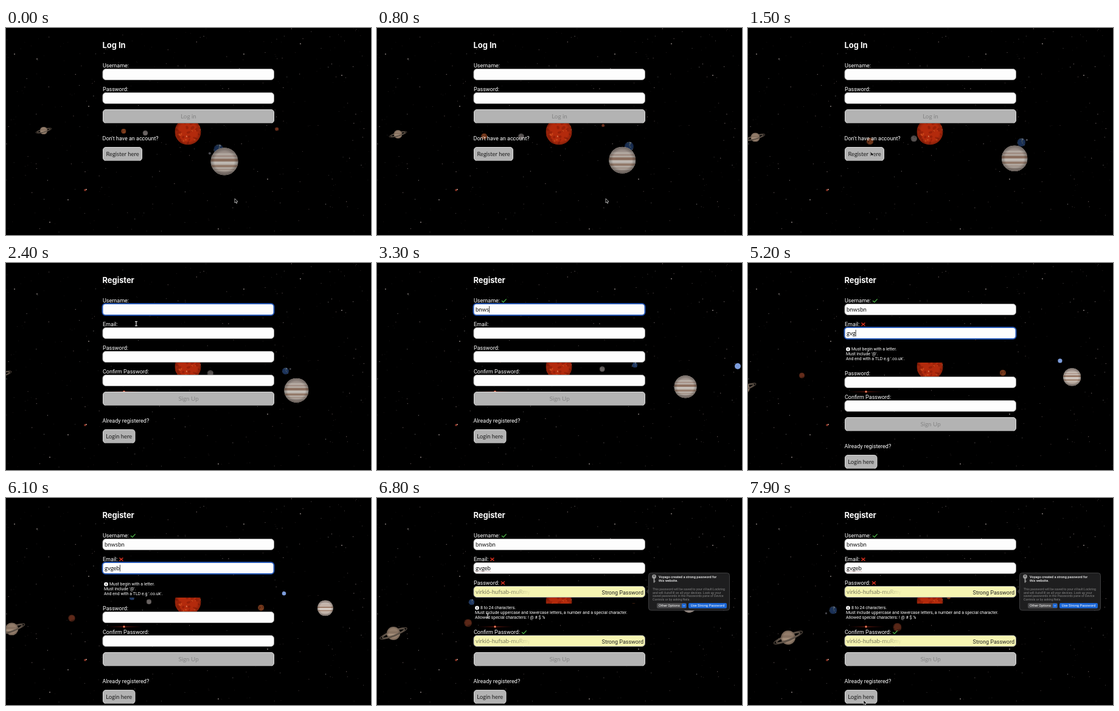
These frames come from a looping animation (600 px wide and 341 px high, 8 s). An HTML page with a canvas:

```html
<!DOCTYPE html>
<html lang="en">
<head>
<meta charset="utf-8">
<title>Register</title>
<style>
html, body { margin: 0; height: 100%; overflow: hidden; background: #000; }
canvas { display: block; width: 100vw; height: 100vh; }
</style>
</head>
<body>
<canvas id="stage" width="600" height="341"></canvas>
<script>
const g = document.getElementById('stage').getContext('2d');
const LOOP = 8000, TAU = Math.PI * 2;
const UI = 'Roboto, Inter, sans-serif', ROUND = 'Lato, "Open Sans", sans-serif';

// ---------- helpers ----------
const KEYS = [0, 1500, 2400, 3300, 5200, 6800, 7900];

// Smooth curve through values given at KEYS
function at(v, t) {
  const last = KEYS.length - 1;
  let i = 0;
  while (i < last - 1 && t >= KEYS[i + 1]) i++;
  const slope = k => {
    const a = Math.max(0, k - 1), b = Math.min(last, k + 1);
    return (v[b] - v[a]) / (KEYS[b] - KEYS[a]);
  };
  const h = KEYS[i + 1] - KEYS[i], u = (t - KEYS[i]) / h, w = 1 - u;
  return v[i] * w * w * (1 + 2 * u) + v[i + 1] * u * u * (3 - 2 * u)
    + h * u * w * (w * slope(i) - u * slope(i + 1));
}

function text(str, x, y, font, color, align = 'left') {
  g.font = font;
  g.fillStyle = color;
  g.textAlign = align;
  g.textBaseline = 'alphabetic';
  g.fillText(str, x, y);
}

function box(x, y, w, h, r, fill, stroke, line = 1) {
  g.beginPath();
  g.roundRect(x, y, w, h, r);
  if (fill) { g.fillStyle = fill; g.fill(); }
  if (stroke) { g.strokeStyle = stroke; g.lineWidth = line; g.stroke(); }
}

function disc(x, y, r, fill) {
  g.beginPath();
  g.arc(x, y, r, 0, TAU);
  g.fillStyle = fill;
  g.fill();
}

function path(points, color, width) {
  g.beginPath();
  points.forEach(([x, y]) => g.lineTo(x, y));
  g.strokeStyle = color;
  g.lineWidth = width;
  g.stroke();
}

function random(seed) {
  return () => (seed = (seed * 16807) % 2147483647) / 2147483647;
}

// ---------- sky ----------
function drawStars() {
  const rnd = random(77);
  for (let i = 0; i < 420; i++) {
    const x = rnd() * 600, y = rnd() * 338, b = rnd();
    const c = 45 + b * b * 65, warm = rnd() * 20;
    disc(x, y, .35 + b * b * .35, `rgb(${c + warm},${c},${c})`);
  }
  for (const [x, y] of [[391, 43], [430, 249], [136, 129], [14, 43], [51, 51], [102, 283], [72, 320], [349, 331], [484, 26], [552, 78]])
    disc(x, y, .9, '#8f8784');
  disc(130, 267, 1.8, '#8c3324');
  disc(132, 266, .9, '#d9b0a0');
  const flare = g.createLinearGradient(165, 0, 225, 0);
  flare.addColorStop(0, '#4000');
  flare.addColorStop(.5, '#902416');
  flare.addColorStop(1, '#4000');
  g.fillStyle = flare;
  g.fillRect(165, 211.6, 60, 1);
  disc(194, 212, 2, '#b03a22');
  disc(194, 212, .9, '#ffc0a0');
}

// Sphere with surface marks and a shaded rim
function globe(x, y, r, base, marks, dark = 0) {
  g.save();
  g.translate(x, y);
  g.scale(r, r);
  g.beginPath();
  g.arc(0, 0, 1, 0, TAU);
  g.clip();
  g.fillStyle = base;
  g.fillRect(-1, -1, 2, 2);
  marks();
  const rim = g.createRadialGradient(0, 0, .7, 0, 0, 1);
  rim.addColorStop(0, `rgba(0,0,0,${dark})`);
  rim.addColorStop(1, `rgba(0,0,0,${dark + .25})`);
  g.fillStyle = rim;
  g.fillRect(-1, -1, 2, 2);
  g.restore();
}

function blotches(color, n, size, seed) {
  const rnd = random(seed);
  for (let i = 0; i < n; i++) {
    g.beginPath();
    g.ellipse(rnd() * 2 - 1, rnd() * 2 - 1, size * (.5 + rnd()), size * (.3 + rnd() * .5), rnd() * 3, 0, TAU);
    g.fillStyle = color;
    g.fill();
  }
}

function jupiterBands() {
  for (const [y, h, c] of [[-1, .4, '#bfb0a8'], [-.45, .12, '#c4aca0'], [-.2, .2, '#a98672'], [.02, .16, '#ece4dc'], [.26, .16, '#b3937f'], [.55, .1, '#c3b0a4'], [.72, .3, '#b3a49b']]) {
    g.fillStyle = c;
    g.fillRect(-1, y, 2, h);
  }
}

const drawSun = () => globe(299, 171, 21.5, '#b32a0c', () => {
  blotches('#9a2008', 26, .14, 5);
  blotches('#c8461a', 12, .09, 31);
  blotches('#f0b080', 3, .06, 9);
});

// R: orbit radius, r: size at the sun's depth, turn: degrees from the front
const planets = [
  { R: 70, r: 4.3, turn: [-90, -18, 26, 78, 176, 312, 350], base: '#6b6564',
    marks: () => blotches('#4d4847', 6, .25, 3) },
  { R: 117, r: 4.4, turn: [-104, -40, -15, 10, 60, 70, 160], base: '#83401f',
    marks: () => blotches('#5e2814', 6, .3, 8) },
  { R: 149, r: 5, turn: [12, 48, 74.5, 109, 185, 265, 303], base: '#1e3762', moon: true,
    marks: () => { blotches('#4f6068', 4, .3, 12); blotches('#8f9fb8', 3, .2, 44); } },
  { R: 184, r: 3.6, turn: [111, 175, 200, 225, 297, 332.5, 351.3], base: '#6e301d',
    marks: () => blotches('#4c2215', 5, .3, 17) },
  { R: 199, r: 10.8, turn: [8.3, 20.8, 28.9, 37.5, 60.8, 81, 95], base: '#dcd0c6', marks: jupiterBands }
];

function drawPlanet(p, t) {
  const { x, y, s, z } = p;
  if (p.moon) {
    const a = t / 3950 * TAU;
    disc(x - 9 * s * Math.cos(a), y + 4 * s * Math.cos(a), 1.2 * s, '#4a4a50');
  }
  globe(x, y, p.r * s, p.base, p.marks, Math.max(0, z) * .2);
}

function drawSaturn(t) {
  const x = at([62, 12, -8, -20, -7, 27, 66], t);
  const y = at([169, 180, 184, 190, 206, 223, 230], t);
  const r = at([6.3, 7.6, 8.2, 8.8, 9.8, 11, 11.8], t);
  const tilt = -.25 - .14 * t / LOOP;
  const ring = (from, to) => {
    for (const [k, w, c] of [[2.15, .14, '#4a4038'], [1.75, .2, '#5f5348']]) {
      g.beginPath();
      g.ellipse(x, y, r * k, r * k * .19, tilt, from, to);
      g.strokeStyle = c;
      g.lineWidth = r * w;
      g.stroke();
    }
  };
  ring(Math.PI, TAU);
  globe(x, y, r, '#927c6a', () => {
    g.fillStyle = '#85705f';
    g.fillRect(-1, -.3, 2, .25);
    g.fillStyle = '#a8927e';
    g.fillRect(-1, .1, 2, .2);
  });
  ring(0, Math.PI);
}

function drawSky(t) {
  drawStars();
  disc(at([640, 625, 612, 593, 513, 410, 340], t), at([186, 180, 176, 170, 161, 155, 154], t),
    at([6, 6, 5.5, 5, 3.6, 3, 2.6], t), '#7d9ddc');
  for (const p of planets) {
    const a = at(p.turn, t) * Math.PI / 180;
    p.z = Math.cos(a);
    p.depth = p.R * p.z;
    const drop = .114 * p.depth;
    p.s = 1 / (1 - .0232 * drop);
    p.x = 299 + p.R * Math.sin(a) * p.s;
    p.y = 173 + drop * p.s;
  }
  const sorted = [...planets].sort((a, b) => a.depth - b.depth);
  sorted.filter(p => p.depth < 0).forEach(p => drawPlanet(p, t));
  drawSun();
  sorted.filter(p => p.depth >= 0).forEach(p => drawPlanet(p, t));
  drawSaturn(t);
}

// ---------- form ----------
const USER = 'bnwsbn', USER_TIMES = [2900, 3000, 3100, 3200, 3800, 4000];
const EMAIL = 'gvgeb', EMAIL_TIMES = [4800, 5000, 5100, 5600, 5800];
const SWITCH = 2000, TO_EMAIL = 4400, TO_PASSWORD = 6400;
const typed = (str, times, t) => str.slice(0, times.filter(k => k <= t).length);

const NOTES = {
  user: ['4 to 24 characters.', 'Must begin with a letter.', 'Letters, numbers, underscores, hyphens allowed.'],
  email: ['Must begin with a letter.', "Must include '@'.", "And end with a TLD e.g '.co.uk'."],
  password: ['8 to 24 characters.', 'Must include uppercase and lowercase letters, a number and a special character.', 'Allowed special characters: ! @ # $ %']
};

function mark(x, y, ok) {
  if (ok) path([[x, y], [x + 2.7, y + 2.6], [x + 7.6, y - 2.6]], '#4fb84a', 1.3);
  else for (const d of [2.5, -2.5]) path([[x, y - d], [x + 6, y + d]], '#d8301e', 1.6);
}

function note(lines, y) {
  box(159, y + 29, 282, 29, 4, '#000');
  disc(164.5, y + 36, 3.3, '#fff');
  text('i', 164.5, y + 38.3, `bold 6px ${UI}`, '#000', 'center');
  lines.forEach((s, i) => text(s, i ? 161 : 170, y + 38.3 + i * 8, `7px ${UI}`, '#fff'));
}

function field(y, f) {
  text(f.label, 159, y - 2, `9px ${UI}`, '#fff');
  if (f.ok !== undefined) mark(159 + g.measureText(f.label).width + 3, y - 5, f.ok);
  if (f.focus) box(158.5, y, 282, 19, 5, '#fdfdfd', '#2456b4', 2);
  else box(159, y + .5, 281.5, 18, 5, f.auto ? '#f6f5b2' : '#fdfdfd', '#a0a0a0');
  if (f.auto) {
    const fade = g.createLinearGradient(215, 0, 255, 0);
    fade.addColorStop(0, '#77775c');
    fade.addColorStop(1, '#77775c00');
    text('virki6-hufsab-muRmy', 162, y + 12.6, `9.5px ${ROUND}`, fade);
    text('Strong Password', 438, y + 14.4, `9px ${UI}`, '#222', 'right');
  } else if (f.value) {
    text(f.value, 162, y + 12.6, `9.5px ${ROUND}`, '#111');
    const end = 162 + g.measureText(f.value).width;
    if (f.focus) path([[end + .5, y + 4], [end + .5, y + 15]], '#111', .8);
    if (f.spell) {
      g.setLineDash([1, 1]);
      path([[162, y + 15], [end, y + 15]], '#c99', 1);
      g.setLineDash([]);
    }
  }
}

function button(x, y, w, label, disabled) {
  box(x + .5, y + .5, w - 1, 22, 4.5, '#b3b3b3', '#dadada');
  path([[x + 4, y + 22.5], [x + w - 4, y + 22.5]], '#8a8a8a', 1);
  text(label, x + w / 2, y + 15, `${disabled ? 9.8 : 9.4}px ${ROUND}`, disabled ? '#858585' : '#1c1c1c', 'center');
}

function form(title, fields, action, question, link, linkWidth) {
  text(title, 158.5, 33, 'bold 12.9px Inter, Roboto, sans-serif', '#fff');
  let y = 67;
  for (const f of fields) {
    field(y, f);
    if (f.note) { note(f.note, y); y += 42; }
    y += 39;
  }
  y -= 11;
  button(159, y, 282, action, true);
  text(question, 158.5, y + 50.5, `9px ${UI}`, '#fff');
  button(159, y + 62, linkWidth, link, false);
}

function drawForm(t) {
  if (t < SWITCH) {
    form('Log In', [{ label: 'Username:' }, { label: 'Password:' }],
      'Log in', "Don't have an account?", 'Register here', 65);
    return;
  }
  const user = typed(USER, USER_TIMES, t), email = typed(EMAIL, EMAIL_TIMES, t);
  const onUser = t < TO_EMAIL, auto = t >= TO_PASSWORD, onEmail = !onUser && !auto;
  const userOk = user.length > 3;
  form('Register', [
    { label: 'Username:', value: user, focus: onUser, ok: user ? userOk : undefined,
      note: user && !userOk && NOTES.user },
    { label: 'Email:', value: email, focus: onEmail, spell: auto, ok: email ? false : undefined,
      note: email && onEmail && NOTES.email },
    { label: 'Password:', auto, ok: auto ? false : undefined, note: auto && NOTES.password },
    { label: 'Confirm Password:', auto, ok: auto || undefined }
  ], 'Sign Up', 'Already registered?', 'Login here', 53.5);
  if (auto) drawPopover();
}

function drawPopover() {
  g.beginPath();
  g.moveTo(447, 149);
  g.lineTo(442, 154);
  g.lineTo(447, 159);
  g.fillStyle = '#29292a';
  g.fill();
  box(446.5, 123.5, 133, 61.5, 4, '#1e1e1f', '#3f3f40');
  disc(455.5, 129.5, 3.4, '#9b9b9b');
  disc(455.5, 128.4, 1, '#1e1e1f');
  path([[455.5, 131], [455.5, 139.5]], '#9b9b9b', 1.8);
  path([[455.5, 137], [457.7, 137]], '#9b9b9b', 1.2);
  ['Voyago created a strong password for', 'this website.'].forEach((s, i) =>
    text(s, 463, 131.5 + i * 6.6, `500 5.6px ${UI}`, '#f2f2f2'));
  ['This password will be saved to your oVault Lockring', 'and will AutoFill on all your devices. Look up your',
    'saved passwords in the Passwords pane of Device', 'Controls or by asking Nela.'].forEach((s, i) =>
    text(s, 453, 151.6 + i * 5.9, `5.2px ${UI}`, '#858585'));
  box(460, 173, 49, 8.8, 2, '#4b4b4d');
  text('Other Options', 463, 179.3, `5.7px ${UI}`, '#fff');
  box(501, 173.8, 7.2, 7.2, 1.6, '#1a66d6');
  path([[503, 176.6], [504.6, 178.2], [506.2, 176.6]], '#fff', .7);
  box(512, 173, 63, 8.8, 2, '#1a66d6');
  text('Use Strong Password', 543.5, 179.3, `5.8px ${UI}`, '#fff', 'center');
}

// ---------- pointer ----------
const ROUTE = [[0, 376, 281], [850, 376, 281], [1450, 202, 204], [1950, 202, 204], [2350, 214, 100],
  [6400, 182, 194], [7200, 182, 194], [7750, 190, 333], [8000, 190, 333]];

function drawPointer(t) {
  if (t > 2800 && t < TO_PASSWORD) return;
  const i = ROUTE.findIndex(k => k[0] > t);
  const [a, ax, ay] = ROUTE[i - 1], [b, bx, by] = ROUTE[i];
  let u = t < TO_PASSWORD && t > 2350 ? 0 : (t - a) / (b - a);
  u = u * u * (3 - 2 * u);
  const x = ax + (bx - ax) * u, y = ay + (by - ay) * u;
  if ((t > 2150 && t < 2801) || (t >= TO_PASSWORD && t < 7350)) {
    for (const [c, w] of [['#333', 2], ['#ddd', 1]]) {
      path([[x, y - 3.5], [x, y + 3.5]], c, w);
      for (const d of [-3.5, 3.5]) path([[x - 2, y + d], [x + 2, y + d]], c, w);
    }
    return;
  }
  g.beginPath();
  for (const [dx, dy] of [[0, 0], [0, 7], [1.6, 5.6], [2.7, 8], [3.8, 7.5], [2.8, 5.2], [5, 5]])
    g.lineTo(x + dx, y + dy);
  g.closePath();
  g.fillStyle = '#000';
  g.fill();
  g.strokeStyle = '#e8e8e8';
  g.lineWidth = .7;
  g.stroke();
}

function frame(now) {
  const t = now % LOOP;
  g.fillStyle = '#000';
  g.fillRect(0, 0, 600, 341);
  drawSky(t);
  drawForm(t);
  drawPointer(t);
  requestAnimationFrame(frame);
}
requestAnimationFrame(frame);
</script>
</body>
</html>
```
